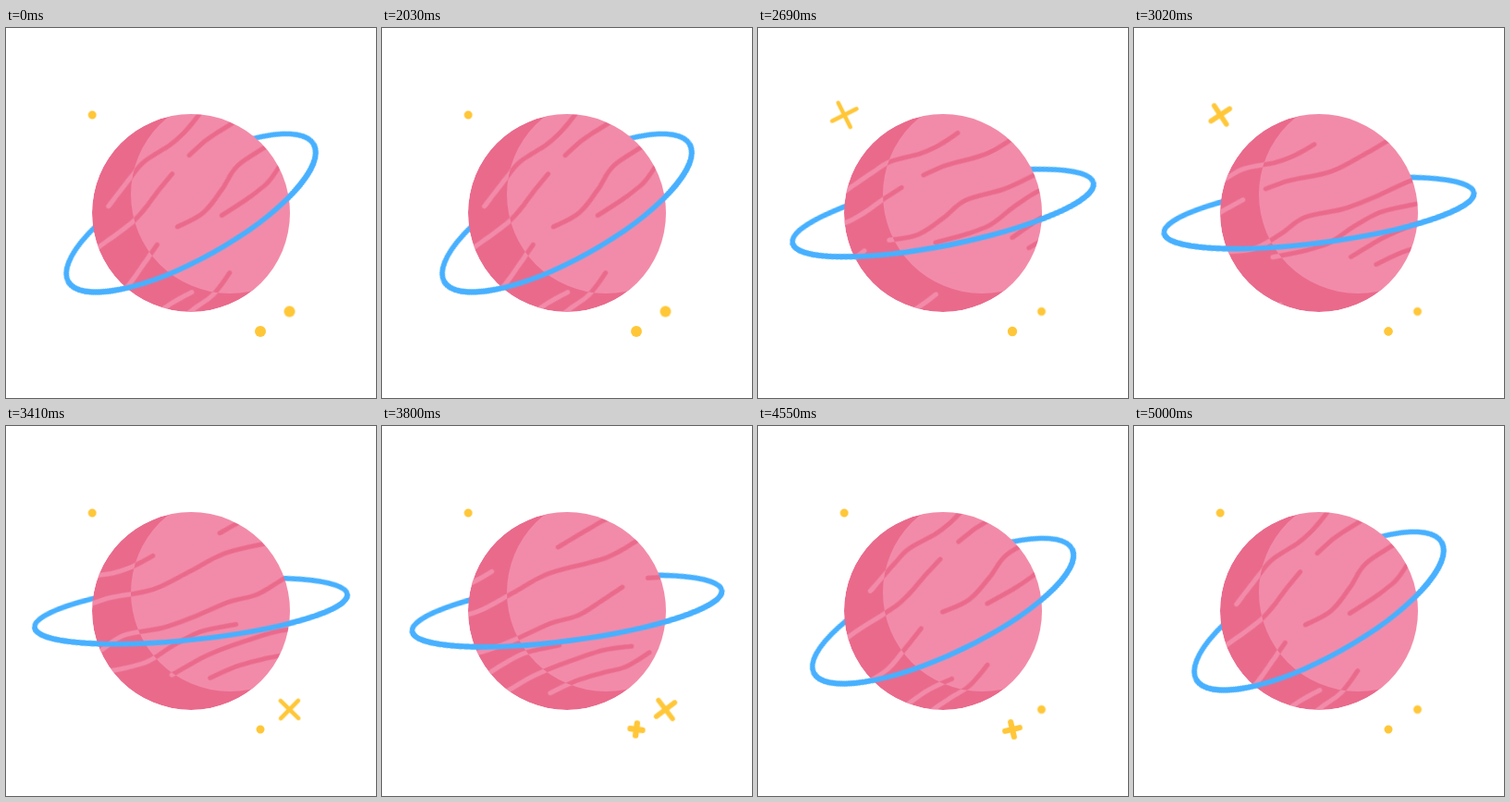
An HTML page that plays this animation: 400x400 px, repeating every 5.06 s.

```html
<!DOCTYPE html>
<html lang="en">
<head>
<meta charset="utf-8">
<title>Planet</title>
<style>
  html, body { margin: 0; width: 100%; height: 100%; overflow: hidden; background: #fff; }
  svg { display: block; width: 100%; height: 100%; }

  :root { --loop: 5060ms; --dark: #ea6a8c; --light: #f28ba9; }
  svg * { animation-duration: var(--loop); animation-iteration-count: infinite; animation-timing-function: linear; }
  path { fill: none; stroke-linecap: round; }

  /* Ring */
  ellipse {
    fill: none; stroke: #47b0ff; stroke-width: 5.6;
    animation-name: ring;
  }
  .front { stroke-dasharray: 1 1; }
  @keyframes ring {
    0%, 39.53% { rx: 152px; ry: 49px; transform: rotate(-29.2deg); animation-timing-function: cubic-bezier(.33, 0, .15, 1); }
    69.17% { rx: 170px; ry: 31px; transform: rotate(-6deg); animation-timing-function: cubic-bezier(.5, 0, .5, 1); }
    98.81%, 100% { rx: 152px; ry: 49px; transform: rotate(-29.2deg); }
  }

  /* Stripes */
  .stripes { stroke-width: 5; animation-name: tilt; }
  .stripes path { animation-name: drift; }
  @keyframes tilt {
    0%, 39.53% { transform: rotate(-44.2deg); animation-timing-function: cubic-bezier(.33, 0, .15, 1); }
    69.17% { transform: rotate(-21deg); animation-timing-function: cubic-bezier(.5, 0, .5, 1); }
    98.81%, 100% { transform: rotate(-44.2deg); }
  }
  @keyframes drift {
    0%, 39.53% { transform: translateX(0); animation-timing-function: cubic-bezier(.333, 0, .667, 1); }
    98.81%, 100% { transform: translateX(calc(-1px * var(--period))); }
  }

  /* Stars */
  .star path { stroke: #ffc738; animation-name: spin, grow, thin; animation-delay: var(--delay); }
  .star circle { fill: #ffc738; }
  @keyframes spin {
    0% { transform: rotate(0deg); animation-timing-function: cubic-bezier(.4, 0, .6, 1); }
    21.94%, 100% { transform: rotate(180deg); }
  }
  @keyframes grow {
    0% { d: path("M-.1 0H.1M0 -.1V.1"); animation-timing-function: cubic-bezier(.39, .575, .565, 1); }
    10.97% { d: path("M-15 0H15M0 -15V15"); animation-timing-function: cubic-bezier(.47, 0, .745, .715); }
    21.94%, 100% { d: path("M-.1 0H.1M0 -.1V.1"); }
  }
  @keyframes thin {
    0% { stroke-width: 8.8px; }
    2.6% { stroke-width: 6.6px; }
    7%, 13% { stroke-width: 4.6px; }
    19.3% { stroke-width: 6.6px; }
    21.94%, 100% { stroke-width: 8.8px; }
  }
  .early { animation-name: early; }
  .late { animation-name: late; }
  @keyframes early {
    0%, 39.53% { r: 6px; }
    51.4% { r: 4.4px; }
    57.3%, 100% { r: 0; }
  }
  @keyframes late {
    0%, 39.53% { r: 6px; }
    65.2% { r: 4.4px; }
    71.1%, 100% { r: 0; }
  }
</style>
</head>
<body>
<svg viewBox="-200 -200 400 400">
  <defs>
    <clipPath id="globe"><circle r="107"/></clipPath>
    <clipPath id="lit"><circle cx="42" cy="-20" r="107"/></clipPath>
  </defs>

  <ellipse rx="152" ry="49"/>

  <g clip-path="url(#globe)">
    <circle r="107" fill="var(--dark)"/>
    <g class="stripes" stroke="var(--light)"></g>
    <g clip-path="url(#lit)">
      <circle r="108" fill="var(--light)"/>
      <g class="stripes" stroke="var(--dark)"></g>
    </g>
  </g>

  <ellipse class="front" rx="152" ry="49" pathLength="2"/>

  <g class="star" transform="translate(-106.7 -106)" style="--delay: -2824ms">
    <path d="M-.1 0H.1M0 -.1V.1"/>
  </g>
  <g class="star" transform="translate(106.5 106.5)" style="--delay: -2025ms">
    <circle class="early" r="6"/>
    <path d="M-.1 0H.1M0 -.1V.1"/>
  </g>
  <g class="star" transform="translate(75 128)" style="--delay: -1415ms">
    <circle class="late" r="6"/>
    <path d="M-.1 0H.1M0 -.1V.1"/>
  </g>
</svg>

<script>
  // Each lane holds one wavy stripe that repeats every `period`.
  const lanes = [
    { period: 217, points: [[-59, -67.5], [-20, -73], [3, -75], [35, -68.5], [56, -67.5], [82, -70.5]] },
    { period: 318, points: [[42, -46], [70, -44.5], [115, -36.5], [160, -40.5], [203, -45], [268, -37], [310, -42], [333, -44.5]] },
    { period: 328, points: [[-21, 0.5], [10, 9], [42, 5], [72, -1.5], [115, 6], [150, 7], [190, 5.5], [222, 9], [250, 4.5], [278, -1]] },
    { period: 322, points: [[22, 25], [58, 32], [85, 34], [115, 28], [148, 24.5], [187, 31]] },
    { period: 310, points: [[97, 57], [140, 51], [175, 51], [220, 54], [251, 62]] },
    { period: 228, points: [[97, 75], [128, 73.5], [158, 76.5], [184, 80], [213, 75.5]] }
  ];
  const SVG = "http://www.w3.org/2000/svg";

  // Smooth curve through the points (Catmull-Rom as cubic Béziers).
  function curve(points, offset) {
    const at = i => points[Math.max(0, Math.min(points.length - 1, i))];
    const place = (x, y) => (x + offset).toFixed(1) + " " + y.toFixed(1) + " ";
    const handle = (i, sign) => {
      const [x, y] = at(i), [x0, y0] = at(i - 1), [x1, y1] = at(i + 1);
      return place(x + sign * (x1 - x0) / 6, y + sign * (y1 - y0) / 6);
    };
    let d = "M" + place(...at(0));
    for (let i = 1; i < points.length; i++) {
      d += "C" + handle(i - 1, 1) + handle(i, -1) + place(...at(i));
    }
    return d;
  }

  for (const group of document.querySelectorAll(".stripes")) {
    for (const { period, points } of lanes) {
      const path = document.createElementNS(SVG, "path");
      path.setAttribute("d", [-1, 0, 1].map(n => curve(points, n * period)).join(""));
      path.style.setProperty("--period", period);
      group.append(path);
    }
  }
</script>
</body>
</html>
```
